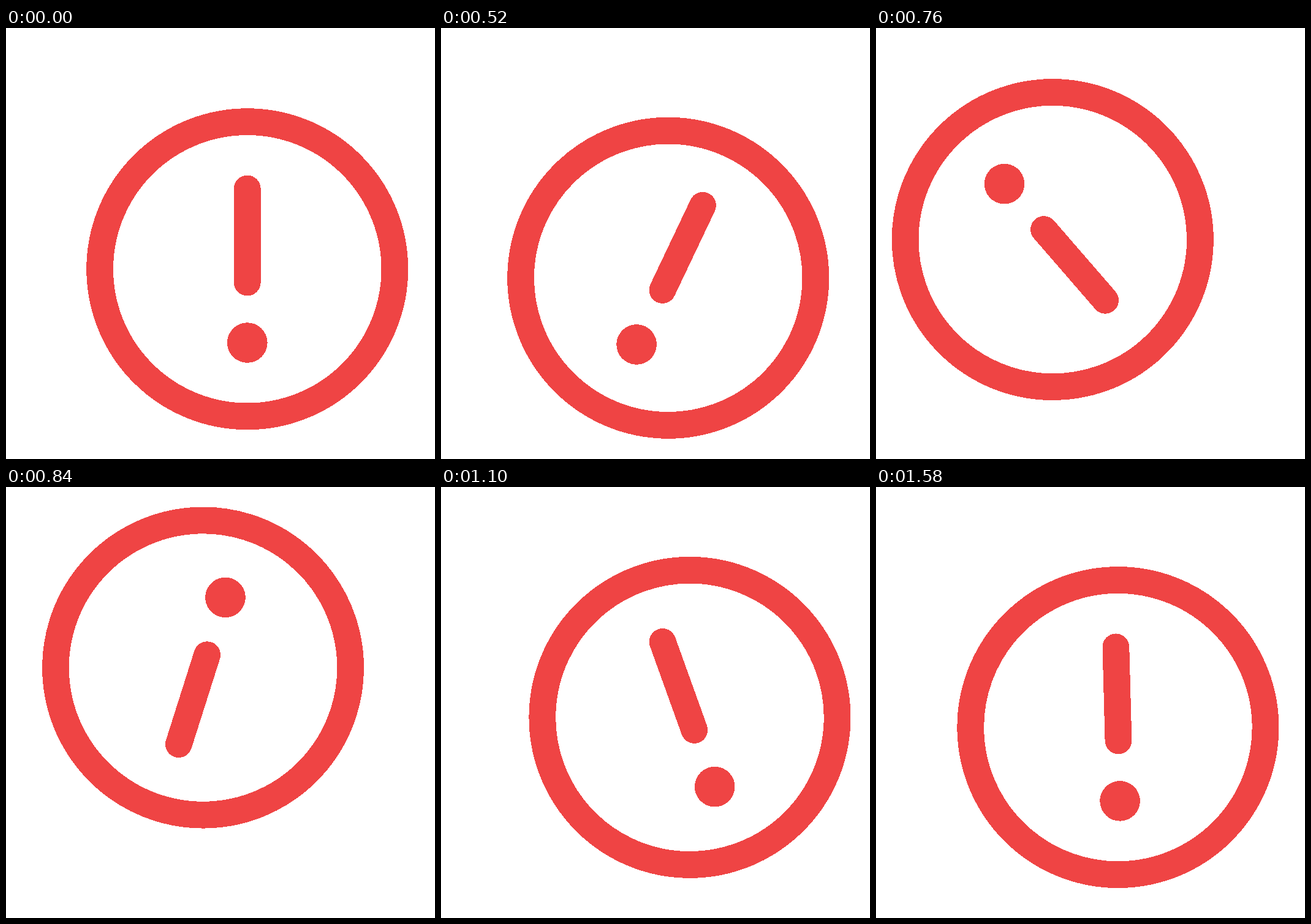
Animation, 700 px wide and 704 px high, one loop 1.6 s. Source, as an HTML page:

```html
<!DOCTYPE html>
<html lang="en">
<head>
<meta charset="utf-8">
<title>Alert</title>
<style>
  html, body { margin: 0; width: 100%; height: 100%; overflow: hidden; background: #fff; }
  svg { display: block; width: 100%; height: 100%; }
</style>
</head>
<body>
<svg viewBox="0 0 700 704" shape-rendering="crispEdges">
  <g id="icon">
    <g transform="translate(393.75 393.75) scale(21.875)" fill="none" stroke="#ef4444" stroke-width="2" stroke-linecap="round">
      <circle r="11"/>
      <path d="M0 -6V1"/>
      <circle cy="5.5" r="1.5" fill="#ef4444" stroke="none"/>
    </g>
  </g>
</svg>
<script>
const LOOP = 1600;
const STEP = 20;
const icon = document.getElementById('icon');

// Wind-up, full turn with overshoot, settle: [time, angle, ease-in handle, ease-out handle]
const keys = [
  [0, 0],
  [220, -10, 0.4, 0.6],
  [1301, 365, 0.6, 0.53],
  [1520, 358, 0.4, 0.6],
  [1700, 360, 0.4, 0.6]
];

// Cubic Bezier easing with control points (a, 0) and (b, 1), solved by bisection
function ease(x, a, b) {
  let lo = 0, hi = 1, s = x;
  for (let i = 0; i < 24; i++) {
    s = (lo + hi) / 2;
    const r = 1 - s;
    if (3 * a * s * r * r + 3 * b * s * s * r + s ** 3 < x) lo = s;
    else hi = s;
  }
  return s * s * (3 - 2 * s);
}

function angleAt(time) {
  const i = keys.findIndex(key => key[0] > time);
  const [t0, from] = keys[i - 1];
  const [t1, to, a, b] = keys[i];
  return from + (to - from) * ease((time - t0) / (t1 - t0), a, b);
}

function draw() {
  const time = Math.round(performance.now() / STEP) * STEP % LOOP;
  icon.setAttribute('transform', `rotate(${angleAt(time)} 350 350)`);
  requestAnimationFrame(draw);
}
draw();
</script>
</body>
</html>
```
